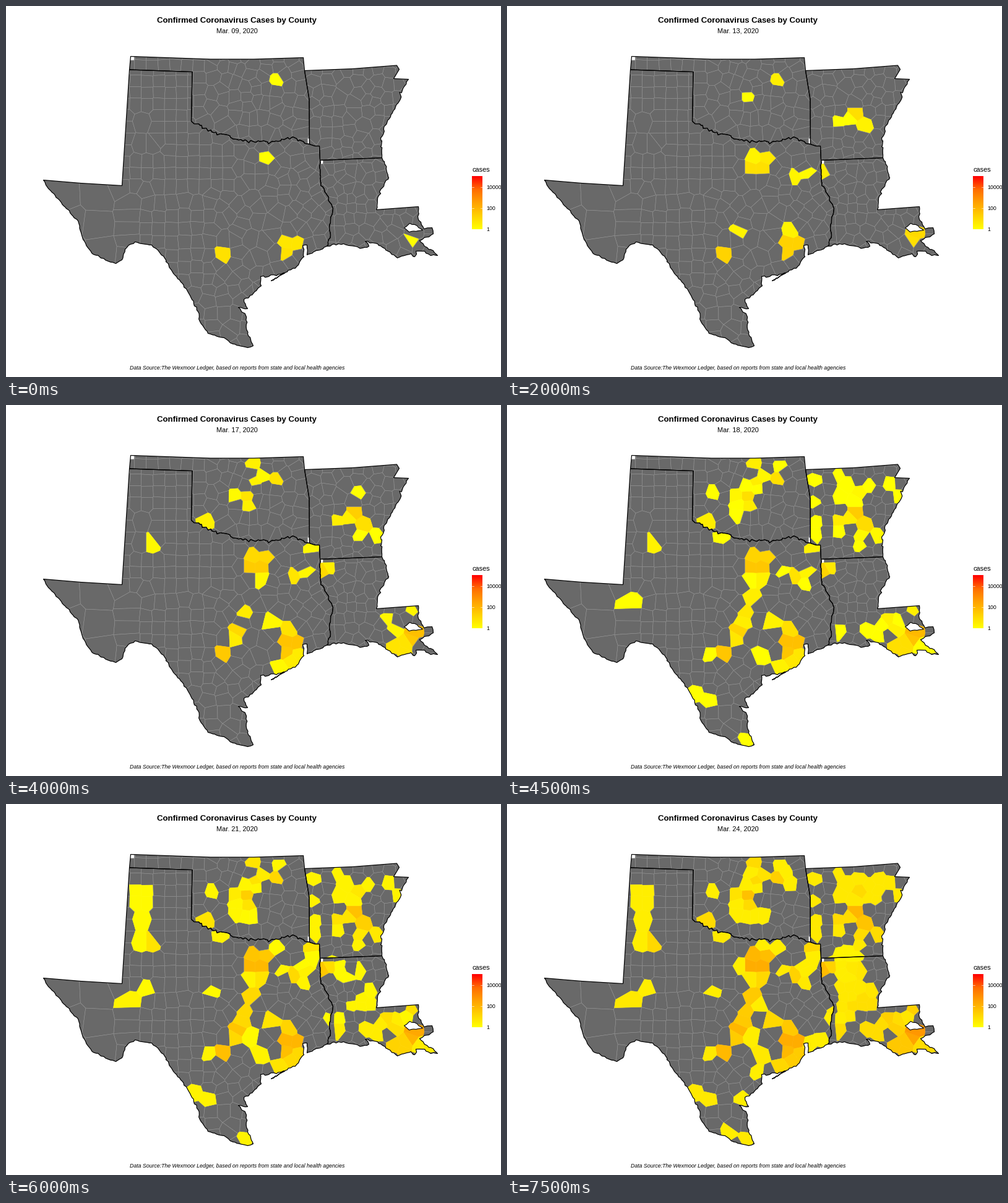
A matplotlib script for the animation above (8 s loop, 800 by 600 pixels).

```python
import numpy as np
import matplotlib.pyplot as plt
from matplotlib.animation import FuncAnimation
from matplotlib.collections import PolyCollection
from matplotlib.colors import LinearSegmentedColormap, to_rgba
from matplotlib.patches import Polygon
from matplotlib.path import Path
from matplotlib.tri import Triangulation

DAYS = 16
PX = 0.72  # points per pixel at 100 dpi
TOP = 5.06  # log10 of the upper end of the colour scale
LAND, LINE = to_rgba("#696969"), to_rgba("#8e8e8e")

plt.rcParams["font.family"] = "Liberation Sans"
rng = np.random.default_rng(9)
heat = LinearSegmentedColormap.from_list(
    "heat", ["#ffff00", "#ffd100", "#ffa100", "#ff6c00", "#ff0000"])

fig = plt.figure(figsize=(8, 6), dpi=100, facecolor="white")
ax = fig.add_axes([0, 0, 1, 1])
ax.axis("off")


def pts(*xy):
    return np.array(xy, float).reshape(-1, 2)


def rough(amp, *xy):
    """Subdivide a line and shake the new points, as a river bank would."""
    line = pts(*xy)
    out = [line[0]]
    for a, b in zip(line[:-1], line[1:]):
        n = max(1, int(np.hypot(*(b - a)) / 3.5))
        for k in range(1, n):
            out.append(a + (b - a) * k / n + rng.normal(0, amp, 2))
        out.append(b)
    return np.array(out)


# Borders
red_river = rough(1.4, 299, 186, 323, 197, 346, 206, 372, 215, 400, 219,
                  433, 219, 465, 212, 490, 223)
bowie = pts(490, 223, 499, 226, 506, 226, 507, 249)
sabine = rough(0.7, 507, 249, 508, 290, 517, 303, 528, 327, 524, 345,
               522, 358, 524, 370, 518, 388)
rio_grande = rough(0.6, 60, 281, 66, 292, 79, 306, 93, 323, 116, 347, 124, 377,
                   138, 399, 164, 412, 177, 416, 187, 410, 192, 393, 208, 381,
                   235, 386, 254, 404, 270, 432, 291, 457, 310, 494, 313, 510,
                   326, 529, 355, 538, 366, 546, 390, 552, 399, 549)
gulf = rough(0.7, 399, 549, 390, 530, 387, 500, 375, 487, 390, 489, 384, 474,
             397, 467, 412, 452, 411, 437, 424, 437, 450, 431, 428, 444,
             470, 420, 481, 405, 479, 387, 486, 386, 486, 402, 518, 388)
bayous = rough(0.9, 518, 388, 545, 384, 575, 391, 586, 388, 580, 380, 600, 384,
               632, 407, 654, 400, 660, 405, 662, 396, 672, 396, 686, 403,
               697, 403, 680, 390, 668, 379, 690, 368, 688, 358, 675, 360,
               665, 340, 666, 324)
river_la = rough(1.3, 598, 329, 603, 300, 618, 277, 611, 251, 607, 245)
river_ar = rough(1.3, 650, 118, 641, 133, 637, 150, 613, 192, 605, 213, 607, 245)

ok_east = pts(480, 83, 482, 104, 489.5, 150, 490, 223)
panhandle = pts(300.5, 106, 199, 102.5)


# Grey county mesh: Voronoi cells of jittered lattices around the key seats
def lattice(x0, y0, x1, y1, pitch, jitter, turn=0.0):
    r = np.arange(-14, 15) * pitch
    grid = np.stack(np.meshgrid(r, r), -1).reshape(-1, 2)
    cos, sin = np.cos(turn), np.sin(turn)
    p = grid @ [[cos, sin], [-sin, cos]] + ((x0 + x1) / 2, (y0 + y1) / 2)
    p = p[(p > (x0, y0)).all(1) & (p < (x1, y1)).all(1)]
    far = np.hypot(*(p[:, None] - seats[None]).T).min(0) > 0.8 * pitch
    return (p + rng.normal(0, jitter, p.shape))[far]


def voronoi(sites):
    tri = Triangulation(*sites.T).triangles
    a, b, c = (sites[tri[:, k]] for k in range(3))
    b, c = b - a, c - a
    d = 2 * (b[:, 0] * c[:, 1] - b[:, 1] * c[:, 0])
    b2, c2 = (b ** 2).sum(1), (c ** 2).sum(1)
    mid = a + np.column_stack([c[:, 1] * b2 - b[:, 1] * c2,
                               b[:, 0] * c2 - c[:, 0] * b2]) / d[:, None]
    cells = []
    for i, site in enumerate(sites):
        ring = mid[(tri == i).any(1)]
        dx, dy = (ring - site).T
        cells.append(ring[np.argsort(np.arctan2(dy, dx))])
    return cells


# Outbreaks: single counties, and areas the cases spread through
hubs, areas = [], []


def outbreak(day, first, last, *xy):
    hubs.extend((x, y, day, np.log10(first), np.log10(last)) for x, y in pts(*xy))


def spread(day, last, x0, y0, x1, y1):
    areas.append((day, np.log10(last), (x0, y0), (x1, y1)))


# Texas
outbreak(0, 1, 60, 418, 244)
outbreak(0, 7, 80, 349, 402, 451, 399)
outbreak(0, 5, 170, 453, 382, 470, 384)
outbreak(1, 2, 170, 411, 262, 393, 262)
outbreak(2, 1, 30, 459, 363)
outbreak(1, 1, 3, 481, 270)
outbreak(4, 2, 90, 399, 244, 376, 365)
outbreak(4, 2, 18, 464, 276, 64, 290)
outbreak(5, 1, 25, 386, 335, 369, 377, 460, 414, 474, 403)
outbreak(7, 1, 12, 412, 280, 428, 351, 444, 425, 235, 224, 494, 230)
outbreak(9, 3, 28, 382, 351, 396, 313)
outbreak(9, 1, 4, 344, 212, 445, 268, 483, 288, 392, 280, 327, 405, 302, 466,
         326, 477, 205, 317, 408, 406, 386, 543)
outbreak(11, 1, 3, 496, 246, 477, 261, 434, 229, 217, 224, 224, 297, 334, 303,
         393, 375, 220, 186)
spread(11, 3, 194, 139, 228, 176)
outbreak(14, 1, 3, 415, 227, 375, 262, 406, 324, 358, 530, 406, 434, 381, 474,
         488, 388, 510, 381)
# Oklahoma
outbreak(0, 1, 20, 438, 119)
outbreak(4, 1, 50, 389, 147)
outbreak(5, 1, 10, 398, 94, 402, 124, 319, 186, 390, 162)
outbreak(7, 1, 6, 369, 147, 413, 114)
outbreak(9, 1, 3, 334, 142, 388, 131, 404, 134, 373, 161, 372, 176, 438, 97)
outbreak(11, 1, 3, 388, 181, 398, 181)
outbreak(14, 1, 3, 395, 110, 414, 180, 449, 112, 458, 128)
# Arkansas
outbreak(2, 1, 40, 577, 193)
outbreak(3, 5, 90, 562, 172)
outbreak(4, 1, 10, 552, 182, 535, 184)
outbreak(8, 1, 10, 571, 141, 572, 212, 600, 212)
outbreak(9, 1, 4, 494, 119, 533, 111, 549, 128, 562, 156, 536, 147, 585, 132,
         618, 125, 634, 149, 495, 158, 498, 187, 497, 208, 536, 205, 572, 227)
spread(14, 4, 545, 118, 612, 160)
spread(14, 2, 527, 232, 578, 250)
# Louisiana
outbreak(0, 1, 280, 656, 380)
outbreak(1, 2, 600, 661, 366)
outbreak(1, 1, 70, 512, 268)
outbreak(5, 1, 18, 523, 262)
outbreak(5, 2, 32, 627, 392, 647, 386, 641, 399)
outbreak(7, 1, 20, 654, 331, 617, 347, 625, 360)
outbreak(9, 1, 9, 606, 356, 630, 349, 600, 373, 667, 388, 682, 396, 538, 365,
         583, 363)
outbreak(11, 1, 5, 574, 268, 590, 302, 647, 342)
spread(11, 3, 528, 249, 553, 283)
spread(11, 8, 552, 312, 592, 336)
spread(11, 3, 523, 338, 551, 358)
spread(13, 4, 527, 250, 570, 352)

hubs = np.array(hubs)
seats = hubs[:, :2]
states = {
    "OK": ([panhandle, pts(201, 81, 330, 85.5, 400, 85.5), ok_east, red_river[::-1]],
           [lattice(180, 65, 330, 240, 18.8, 0.8), lattice(330, 65, 510, 240, 17.5, 3)]),
    "TX": ([panhandle[::-1], red_river, bowie, sabine, gulf[::-1],
            rio_grande[::-1], pts(120, 286, 187, 290)],
           [lattice(180, 84, 425, 307, 18.7, 0.5), lattice(425, 190, 540, 307, 17.5, 3),
            lattice(195, 307, 340, 455, 20.5, 1.5), lattice(270, 455, 430, 580, 19.5, 2),
            lattice(340, 307, 550, 455, 19, 2.2, 0.7), lattice(20, 260, 180, 440, 45, 4)]),
    "AR": ([ok_east[1:], bowie, river_ar[::-1],
            pts(626, 117, 635, 102, 631, 95.5, 560, 101)],
           [lattice(465, 75, 670, 265, 16.5, 2.5)]),
    "LA": ([sabine, bayous, river_la], [lattice(490, 230, 720, 425, 16.5, 2.8)]),
}


def add_state(parts, lattices):
    xy = np.vstack(parts)
    own = hubs[Path(xy).contains_points(seats)]
    plain = np.vstack(lattices)
    sites = np.vstack([plain, own[:, :2]])
    quiet = np.tile([DAYS, 0.0, 0.0], (len(plain), 1))
    course = np.vstack([quiet, own[:, 2:]])
    for day, last, low, high in areas:
        hit = ((sites > low) & (sites < high)).all(1) & (course[:, 0] > day)
        course[hit] = day, 0, last

    edge = dict(fill=False, edgecolor="black", linewidth=1.2 * PX, joinstyle="round")
    border = ax.add_patch(Polygon(xy, zorder=5, **edge))
    cells = PolyCollection(voronoi(sites), linewidths=0.6 * PX, zorder=2)
    ax.add_collection(cells)
    cells.set_clip_path(border)
    return cells, course


layers = [add_state(*state) for state in states.values()]

lake = rough(0.4, 643, 358, 652, 351, 664, 355, 673, 362, 651, 365, 643, 358)
ax.add_patch(Polygon(lake, facecolor="white", edgecolor="black",
                     linewidth=1.1 * PX, zorder=5))

# Legend and text
ax.imshow(np.linspace(1, 0, 256)[:, None], cmap=heat, aspect="auto",
          extent=(752.5, 769.5, 360.5, 274.5), zorder=4)
for power in (0, 2, 4):
    y = 360.5 - 86 * power / TOP
    for x in (752.5, 766.1):
        ax.plot([x, x + 3.4], [y, y], color="white", lw=0.6 * PX, zorder=5)
    ax.text(776, y + 3.2, str(10 ** power), fontsize=8.8 * PX)
ax.text(752.5, 268, "cases", fontsize=11 * PX)


def centred(y, text, size, **style):
    return ax.text(373, y, text, ha="center", fontsize=size * PX, **style)


centred(27, "Confirmed Coronavirus Cases by County", 13.2, weight="bold")
centred(587, "Data Source:The Wexmoor Ledger, based on reports from state and "
        "local health agencies", 8.8, style="italic")
date = centred(43, "", 11)
ax.set(xlim=(-0.5, 799.5), ylim=(599.5, -0.5))


def draw(day):
    date.set_text(f"Mar. {9 + day:02d}, 2020")
    for cells, course in layers:
        start, low, high = course.T
        age = np.clip((day - start) / np.maximum(DAYS - 1 - start, 1), 0, 1)
        colours = heat((low + (high - low) * age ** 0.8) / TOP)
        active = (day >= start)[:, None]
        cells.set_facecolor(np.where(active, colours, LAND))
        cells.set_edgecolor(np.where(active, colours, LINE))


anim = FuncAnimation(fig, draw, frames=DAYS, interval=500, repeat=True)
plt.show()
```
